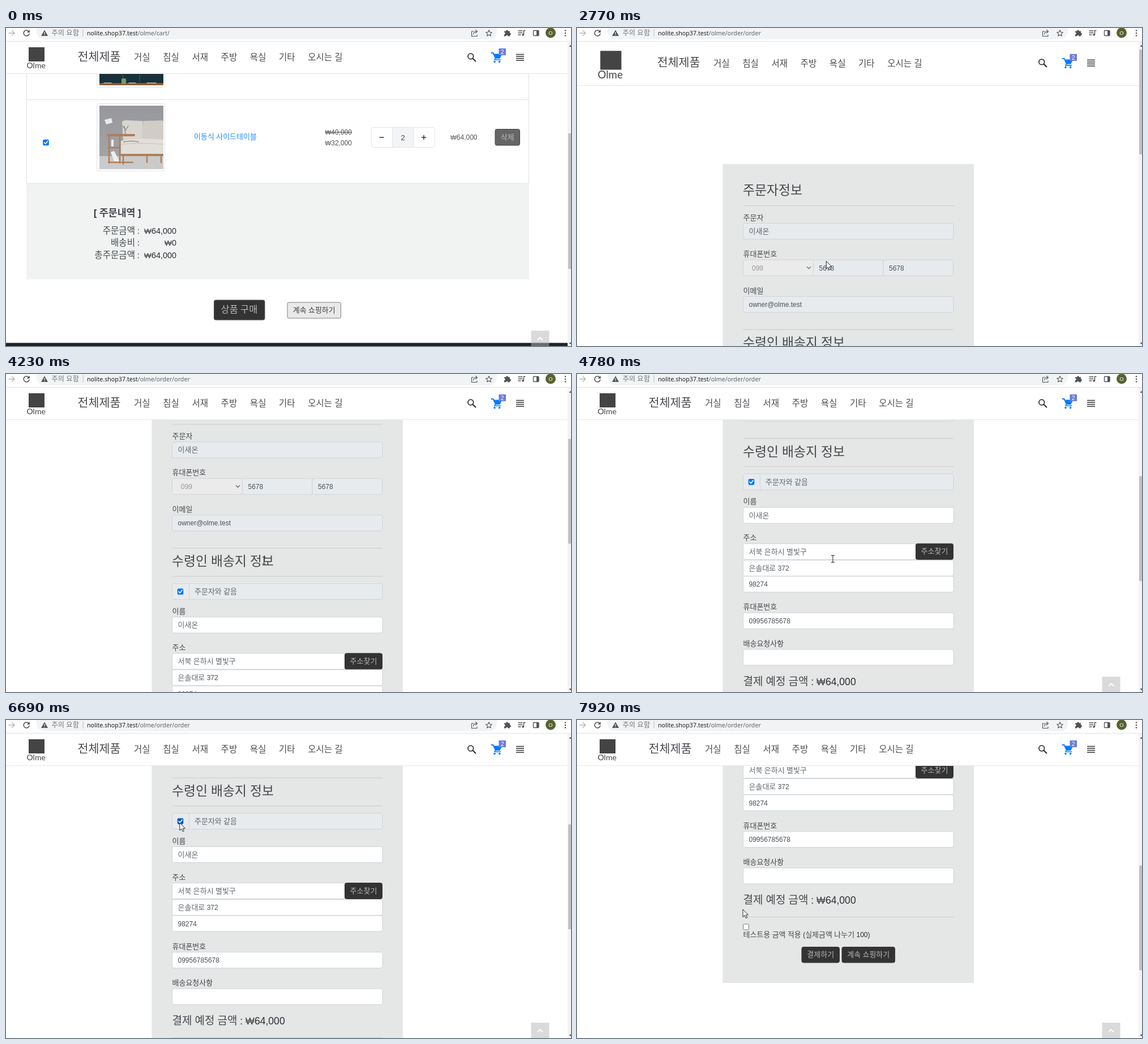
Write an HTML page that moves like this. It is 998 by 561 pixels and loops after 7990 ms.

```html
<!DOCTYPE html>
<html lang="ko">
<head>
<meta charset="utf-8">
<title>Cart to order</title>
<style>
html, body { margin: 0; width: 100%; height: 100%; overflow: hidden; background: #fff; }
svg { display: block; width: 100vw; height: 100vh; font-family: 'Liberation Sans', Arial, sans-serif; font-weight: 300; }
text { white-space: pre; }
.hangul { font-family: 'Noto Sans CJK KR', 'Noto Sans CJK', sans-serif; font-size: 1.083em; fill-opacity: .86; }
.won { font-family: 'DejaVu Sans', sans-serif; font-size: .95em; fill-opacity: .9; }
.url { font-family: 'Noto Sans', sans-serif; font-weight: 400; }
.brand { font-family: Lato, sans-serif; font-weight: 400; }
.line { fill: none; stroke-linecap: round; stroke-linejoin: round; }
</style>
</head>
<body>
<svg id="stage" viewBox="0 0 998 561" preserveAspectRatio="none"></svg>
<script>
const LOOP = 7990;
const INK = '#2b2f33', DARK = '#333', BORDER = '#ced4da', BLUE = '#007bff', ICON = '#50545a';

const rect = (x, y, w, h, fill, extra = '') =>
  `<rect x="${x}" y="${y}" width="${w}" height="${h}" fill="${fill}" ${extra}/>`;
const box = (x, y, w, h, fill, stroke, r = 3, extra = '') =>
  rect(x, y, w, h, fill, `stroke="${stroke}" rx="${r}" ${extra}`);
const circle = (x, y, r, fill, extra = '') =>
  `<circle cx="${x}" cy="${y}" r="${r}" fill="${fill}" ${extra}/>`;
const shape = (d, fill, extra = '') => `<path d="${d}" fill="${fill}" ${extra}/>`;
const line = (d, stroke, width = 1) =>
  `<path class="line" d="${d}" stroke="${stroke}" stroke-width="${width}"/>`;
const group = (id, content) => `<g id="${id}">${content}</g>`;

// y is the visual middle of the text line
const text = (x, y, size, str, fill = INK, extra = '') => {
  const runs = str.replace(/[가-힣]+/g, '<tspan class="hangul">$&</tspan>')
                  .replace(/₩/g, '<tspan class="won">₩</tspan>');
  return `<text x="${x}" y="${y + size * 0.385}" font-size="${size}" fill="${fill}" ${extra}>${runs}</text>`;
};
const END = 'text-anchor="end"', MID = 'text-anchor="middle"';

const checkbox = (x, y, on, extra = '') => on
  ? rect(x - 5.3, y - 5.3, 10.6, 10.6, '#0075ff', `rx="2" ${extra}`)
    + line(`M${x - 3} ${y}l2.2 2.4 4-5`, '#fff', 1.6)
  : box(x - 5, y - 5, 10, 10, '#fff', '#767676', 2);

const button = (x, y, w, h, label, fill = DARK, color = '#ccc', stroke = fill) =>
  box(x, y, w, h, fill, stroke) + text(x + w / 2, y + h / 2 - 0.5, 12, label, color, MID);

const field = (y, value, fill = '#fff', x = 293.5, w = 371.5) =>
  box(x, y, w, 28, fill, BORDER) + text(x + 10, y + 14, 12, value, '#495057');

function photo() {
  const wood = '#ad8059';
  return box(160.5, 133.5, 120, 118.5, '#fff', '#dee2e6')
    + rect(165, 137, 113, 111.5, 'url(#wall)')
    + rect(165, 226, 113, 22.5, '#cbcaca')
    + shape('M174 162l12-3 2 8-11 3z', '#eceaea')
    + shape('M205 166q2-4 12-3l24 1 3 34h-37z', '#d9d5cf')
    + shape('M242 164l34-1 2 2v33h-38z', '#d1ccc5')
    + shape('M203 199q30-6 75-2v27h-75z', '#e2deda')
    + line('M204 205q35-3 74 0', '#c7c2ba')
    + rect(203, 222, 75, 4, wood)
    + line('M207 226v14M249 226v11M274 226v11', wood, 2.5)
    + line('M180 189h46', wood, 4)
    + line('M182 190v48M201 190v48M181 211h20M181 237h43', wood, 2.5)
    + shape('M185 219l6-2 9 18h-9zM186 197h4v12h-4z', '#f2efec')
    + line('M208 201q15-3 26 0', '#aaa18f', 2)
    + line('M211 187l-2-14M211 180l5-7M210 178l-4-5', '#7d7f70', 1.2);
}

function upperPhoto() {
  return box(160.5, 70, 120, 34.5, '#fff', '#dee2e6')
    + rect(165, 80, 113, 21, '#18313a')
    + rect(165, 97, 113, 4, '#8d5933')
    + rect(204, 89, 8, 10, '#7e9964', 'rx="2"')
    + line('M208 89l-3-7M236 95v-12', '#3f5c50', 1.2)
    + line('M173 97h13M217 97h12M249 97h16', '#c9beb0', 1.5);
}

function cartPage() {
  const grid = '#dee2e6';
  const totals = [['주문금액 :', '₩64,000'], ['배송비 :', '₩0'], ['총주문금액 :', '₩64,000']];
  return rect(0, 24, 992, 537, '#fff')
    + rect(36, 275, 888, 168.5, '#f1f3f3')
    + line('M36.5 80V275M923.5 80V275M36.5 126.5H923.5M36.5 274.5H923.5', grid)
    + upperPhoto() + photo()
    + checkbox(70.5, 202, true)
    + text(332, 191.5, 12, '이동식 사이드테이블', BLUE)
    + text(611, 183, 12, '₩40,000', '#555', END + ' text-decoration="line-through"')
    + text(611, 202, 12, '₩32,000', '#555', END)
    + box(645.5, 175.5, 111.5, 35, '#fff', '#e2e5e8')
    + rect(682.5, 175.5, 37.5, 35, '#f2f4f5', 'stroke="#e2e5e8"')
    + line('M660 193h7M734.5 193h7M738 189.5v7', DARK, 1.5)
    + text(701, 193, 13, '2', '#444', MID)
    + text(832.5, 192, 12, '₩64,000', '#555', END)
    + button(864, 178.5, 43.5, 28.5, '삭제', '#666', '#c8c8c8', '#444')
    + text(155, 326, 16, '[ 주문내역 ]', INK, 'font-weight="700"')
    + totals.map(([label, sum], i) =>
        text(236, 357 + i * 21.5, 14.4, label, INK, END) + text(301, 357 + i * 21.5, 14.4, sum, INK, END)).join('')
    + box(366, 478.5, 92.5, 37.5, 'none', '#b9bec3', 5, 'id="ring" stroke-width="3"')
    + box(367.5, 480, 89.5, 35, DARK, '#555', 3, 'id="buy"')
    + text(412, 496.5, 15.2, '상품 구매', '#ccc', MID + ' id="buyLabel"')
    + button(497, 484, 94.5, 28, '계속 쇼핑하기', '#e8e9e8', '#222', '#7c8083')
    + rect(0, 555.5, 992, 5.5, '#212226');
}

function orderPage() {
  const off = '#e8ebee';
  const heading = (y, str) => text(293, y, 21.1, str);
  const label = (y, str) => text(293.5, y, 12, str);
  const rule = y => line(`M294 ${y}H665`, '#cbccce');
  return rect(257.5, 240, 443.5, 867, '#e5e6e6')
    + heading(286, '주문자정보') + rule(313.5)
    + label(334, '주문자') + field(344.5, '이새온', off)
    + label(398, '휴대폰번호')
    + field(409, '', '#ebebeb', 293.5, 124) + text(309, 423, 12, '099', '#999')
    + line('M406.5 421.5l3 3 3-3', '#777', 1.5)
    + field(409, '5678', off, 417.5, 123.5) + field(409, '5678', off, 541, 123.5)
    + label(463, '이메일') + field(473.5, 'owner@olme.test', off)
    + rule(532) + heading(555, '수령인 배송지 정보') + rule(581.5)
    + field(594.5, '', off) + line('M323.5 595v27', BORDER)
    + checkbox(308, 608.5, true, 'id="same"') + text(333, 608.5, 12, '주문자와 같음', '#495057')
    + label(643, '이름') + field(653.5, '이새온')
    + label(707, '주소') + field(717.5, '서북 은하시 별빛구', '#fff', 293.5, 305)
    + button(598.5, 717.5, 66, 28, '주소찾기')
    + field(746.5, '은솔대로 372') + field(775, '98274')
    + label(829, '휴대폰번호') + field(839.5, '09956785678')
    + label(893.5, '배송요청사항') + field(904, '')
    + text(293.5, 960, 17.6, '결제 예정 금액 : ₩64,000')
    + rule(990.5) + checkbox(298.5, 1008, false)
    + label(1021.5, '테스트용 금액 적용 (실제금액 나누기 100)')
    + button(397, 1043.5, 66.5, 27.5, '결제하기')
    + button(468, 1043.5, 93.5, 27.5, '계속 쇼핑하기');
}

function siteHeader() {
  const items = ['거실', '침실', '서재', '주방', '욕실', '기타', '오시는 길'];
  return rect(0, 24, 992, 56, '#fff', 'id="bar"')
    + group('barLine', rect(0, 80, 992, 1, '#e6e7e8'))
    + group('logo', rect(40, 34, 28, 25, '#444')
        + text(36.5, 65.5, 14, 'Olme', '#444', 'class="brand"'))
    + group('nav', text(126.5, 50.5, 19.1, '전체제품')
        + items.map((name, i) => text(226 + i * 51.2, 51.5, 14.4, name)).join(''))
    + group('tools',
        circle(820.8, 50, 4.8, 'none', `stroke="${DARK}" stroke-width="1.8"`)
        + line('M824.5 53.7l4.8 4.8', DARK, 2.2)
        + line('M857.5 44h3l4.2 9h7l3-6', BLUE, 1.8)
        + shape('M861.5 45.5H875l-3.5 7h-7z', BLUE)
        + line('M864.5 53l-1.5 3h10.5', BLUE, 1.6)
        + circle(863, 59.5, 1.8, BLUE) + circle(871.7, 59.5, 1.8, BLUE)
        + rect(870.5, 36, 12.5, 12, '#6b7dd6')
        + text(876.8, 42, 10, '2', '#fff', MID)
        + [46.5, 50, 53.5, 57].map(y => rect(901, y - 0.7, 14, 1.5, DARK)).join(''));
}

function browserBar() {
  return rect(0, 0, 998, 24, '#fff')
    + rect(54, -20, 813, 40, '#f1f3f4', 'rx="14"')
    + rect(0, 23, 998, 1, '#e1e2e4')
    + line('M5 9h10M10.5 4.5L15 9l-4.5 4.5', '#b4b6b9', 1.4)
    + group('reload', line('M40.3 6.2a5 5 0 1 0 .7 4', ICON, 1.6) + shape('M41.8 3v5h-5z', ICON))
    + group('stop', line('M32 5l8 8M40 5l-8 8', ICON, 1.6))
    + shape('M68 3.5l6 10.5H62z', ICON) + line('M68 7.5v3M68 12.3v.1', '#fff', 1.2)
    + text(80.5, 8.5, 11.4, '주의 요함', '#5f6368')
    + rect(135.5, 2, 1, 13, '#b9bcc0')
    + `<text class="url" x="143" y="12.8" font-size="10.65" fill="#202124">nolite.shop37.test<tspan id="path" fill="#5f6368"></tspan></text>`
    + line('M826 6h-3.5v8.5H832V12M825.5 11q1-5 6-5M829.5 3.5l3 2.7-3 2.8', ICON, 1.1)
    + line('M853 3.8l1.6 3.5 3.8.4-2.9 2.5.9 3.8-3.4-2-3.4 2 .9-3.8-2.9-2.5 3.8-.4z', ICON, 1.1)
    + shape('M880 5.5h3a2 2 0 0 1 4 0h3v3.2a2 2 0 0 1 0 4v1.8h-3.3a1.8 1.8 0 0 0-3.6 0H880v-3.3a1.8 1.8 0 0 0 0-3.6z', ICON)
    + line('M905 5h7M905 8.5h7M905 12h4M914.5 12V4.5h2.5', ICON, 1.4)
    + circle(913, 12, 1.8, ICON)
    + box(931.5, 4.5, 9.5, 9, '#fff', ICON, 1, 'stroke-width="1.4"') + rect(937, 4.5, 4, 9, ICON)
    + circle(962, 8.5, 9, '#56632f') + text(962, 8.5, 9.5, 'O', '#fff', MID)
    + [4.5, 9, 13.5].map(y => circle(988, y, 1.3, ICON)).join('');
}

const scrollbar = rect(992, 24, 6, 537, '#f3f3f3')
  + shape('M994.5 33l2.5-3 2.5 3zM994.5 555l2.5 3 2.5-3z', '#505050')
  + rect(993, 186, 5, 239, '#c1c1c1', 'id="thumb"');
const toTop = group('toTop',
  rect(927.5, 534, 32, 27, '#b5b5b5', 'fill-opacity=".5"') + line('M939.5 550l4-4 4 4', '#fff', 2));

const cursors = {
  arrow: shape('M0 0V13.5L3.1 10.7 5.3 15.5 7.5 14.5 5.4 9.9H9.5Z', '#fff', 'stroke="#222"'),
  hand: shape('M-1.7 1.5a1.7 1.7 0 0 1 3.4 0V7l5 1q2.8.6 2.6 3.4l-.8 4.1-1 4H-1l-4.5-7q-.8-2.2 1.5-2l2.3 2z', '#fff', 'stroke="#222"')
    + line('M2 11v4M4.5 11.5V15', '#222', 0.8),
  beam: line('M-2.5-6h2l.5.5.5-.5h2M-2.5 6h2l.5-.5.5.5h2M0-5.5V5.5', '#333', 1.1)
};

document.getElementById('stage').innerHTML =
  `<defs><linearGradient id="wall" x2="0" y2="1"><stop stop-color="#97989c"/><stop offset="1" stop-color="#a6a6a9"/></linearGradient></defs>`
  + rect(0, 0, 998, 561, '#fff')
  + group('cart', cartPage()) + group('order', orderPage())
  + toTop + siteHeader() + browserBar() + scrollbar
  + group('cursor', Object.entries(cursors).map(([id, art]) => group(id, art)).join(''));

// Keys are [time, ...values], joined by straight lines
function track(keys, t) {
  const next = keys.findIndex(key => key[0] > t);
  if (next === 0) return keys[0].slice(1);
  if (next < 0) return keys[keys.length - 1].slice(1);
  const a = keys[next - 1], b = keys[next], p = (t - a[0]) / (b[0] - a[0]);
  return a.slice(1).map((v, i) => v + (b[i + 1] - v) * p);
}

const pointerKeys = [
  [320, 938, 545], [600, 790, 515], [850, 570, 460], [1070, 417, 440], [1140, 418, 454], [1280, 424.5, 494],
  [2350, 424.5, 494], [3190, 456, 329], [4000, 456, 329], [4640, 455, 329], [4780, 452, 326],
  [5400, 394, 408], [5740, 305, 178], [6149, 305, 178], [6150, 307, 181], [6690, 307, 181],
  [7250, 244, 330], [7510, 244, 330], [7850, 293, 334]
];
const scrollKeys = [
  [3500, 0], [3610, 41], [3680, 72], [3800, 80], [3960, 143], [4090, 160], [4230, 224], [4440, 358],
  [4640, 358], [4780, 418], [4850, 430], [6900, 430], [7110, 501], [7510, 501], [7780, 643]
];
const growKeys = [[3520, 3], [3610, 1], [3700, 0]];

const $ = id => document.getElementById(id);
const set = (id, name, value) => $(id).setAttribute(name, value);
const show = (id, on) => set(id, 'display', on ? 'inline' : 'none');
const move = (id, x, y, scale = 1) => set(id, 'transform', `translate(${x} ${y}) scale(${scale})`);

function draw(t) {
  const ordering = t >= 2350;
  const [scroll] = track(scrollKeys, t);
  const grow = ordering ? track(growKeys, t)[0] : 0;
  const hover = t >= 1210;

  show('cart', !ordering);
  show('order', ordering);
  move('order', 0, -scroll);
  set('same', 'fill', t >= 5740 && t < 6760 ? '#0b57c8' : '#0075ff');

  set('buy', 'fill', hover ? '#6c757d' : DARK);
  set('buyLabel', 'fill', hover ? '#fff' : '#ccc');
  show('ring', t >= 1340);

  set('bar', 'height', 56 + 7 * grow);
  move('barLine', 0, 7 * grow);
  const zoom = 1 + 0.11 * grow;
  move('logo', 36.5 * (1 - zoom), 33 * (1 - zoom) + 2 * grow, zoom);
  move('nav', 5 * grow, 3.5 * grow);
  move('tools', 0, 3.3 * grow);

  const loading = t >= 1410 && t < 1950;
  show('stop', loading);
  show('reload', !loading);
  $('path').textContent = t < 1750 ? '/olme/cart/' : '/olme/order/order';

  set('thumb', 'y', ordering ? 38 + scroll * 0.34 : 186);
  set('thumb', 'height', ordering ? 185 : 239);
  set('toTop', 'opacity', ordering ? Math.max(0, Math.min(1, (scroll - 270) / 80)) : 1);

  const kind = t < 1210 ? 'arrow' : t < 2350 ? 'hand' : t >= 4000 && t < 5050 ? 'beam' : 'arrow';
  show('cursor', t >= 320);
  for (const id in cursors) show(id, id === kind);
  move('cursor', ...track(pointerKeys, t));
}

const start = performance.now();
function tick() {
  draw((performance.now() - start) % LOOP);
  requestAnimationFrame(tick);
}
tick();
</script>
</body>
</html>
```
